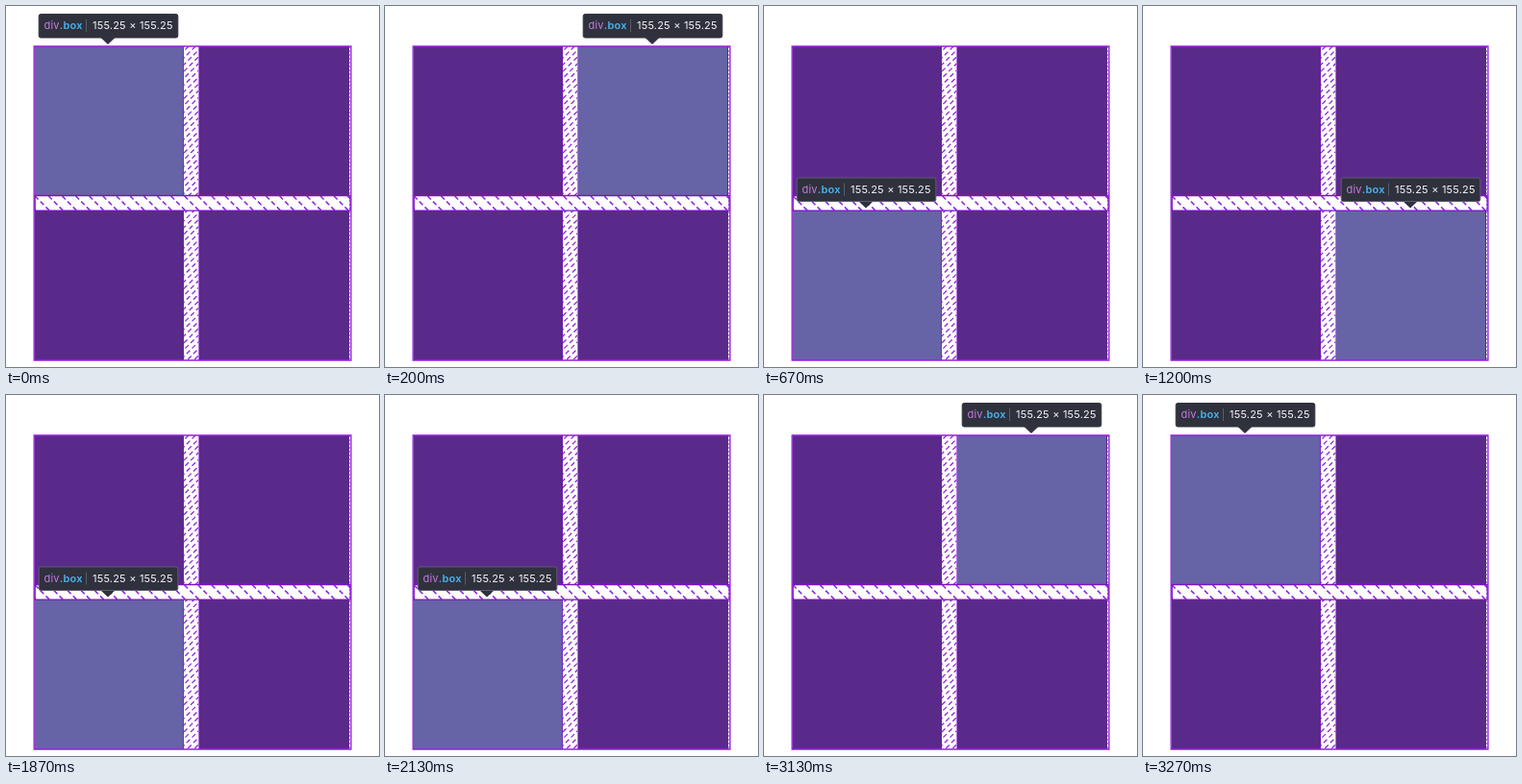
Animation of 388x376 px, one loop 3.79 s. Source, as an HTML page:

```html
<!DOCTYPE html>
<html lang="en">
<meta charset="utf-8">
<title>Grid inspector</title>
<style>
html, body { margin: 0; width: 100%; height: 100%; overflow: hidden; background: #fff; }
svg { display: block; }
.hatch { stroke: #8f2bd6; stroke-width: 1.6; stroke-dasharray: 5 3; fill: none; }
#column { stroke-width: 1.3; }
.line { stroke: #7f10c8; fill: none; }
text { font: 11px Inter, sans-serif; letter-spacing: .2px; fill: #f4f4f6; }
</style>
<svg width="388" height="376" viewBox="0 0 388 376">
  <path d="M30 42h155v155h-155zM201 42h156v155h-156zM30 213h155v156h-155zM201 213h156v156h-156z" fill="#5a2a8a"/>
  <rect id="lit" width="155" fill="#6663a7"/>
  <svg x="185" y="42" width="15" height="327"><path id="column" class="hatch"/></svg>
  <path d="M30 198h328v15h-328z" fill="#fff"/>
  <svg x="30" y="198" width="328" height="15"><path id="row" class="hatch"/></svg>
  <path class="line" d="M184.5 42v155M200.5 42v155M184.5 213v156M200.5 213v156" stroke-opacity=".6"/>
  <path class="line" d="M30.2 197.5h328v15.700h-328z" stroke-width="1.3"/>
  <path class="line" d="M357.5 42v327" stroke-dasharray="2 2" stroke-opacity=".5"/>
  <path class="line" d="M29.200 42h329.700v327h-329.700z" stroke-width="1.4" style="stroke:#9420da"/>
  <g id="tip">
    <path d="M64 24.5h16l-8 7.5z" fill="#2f313d"/>
    <rect id="panel" x=".2" y=".5" width="144.600" height="24.500" rx="2" fill="#2f313d"/>
    <text x="5.500" y="16"><tspan fill="#c77be0">div</tspan><tspan fill="#4bb4ec" font-weight="600">.box</tspan></text>
    <path d="M49.500 6v13" stroke="#5a5c68"/>
    <text x="56" y="16">155.25 × 155.25</text>
  </g>
</svg>
<script>
const $ = id => document.getElementById(id);
const set = (id, attrs) => {
  for (const key in attrs) $(id).setAttribute(key, attrs[key]);
};
const LOOP = 3790;
// [start ms, column, row]
const steps = [[0, 0, 0], [200, 1, 0], [670, 0, 1], [1200, 1, 1],
               [1870, 0, 1], [2470, 1, 0], [3270, 0, 0]];

function hatch(id, from, to, gap, dx, dy) {
  let d = '';
  for (let x = from; x < to; x += gap) d += `M${x} 0l${dx} ${dy}`;
  set(id, { d });
}
hatch('column', 5, 345, 7.07, -327, 327);
hatch('row', -14, 330, 14.14, 15, 15);

function draw(now) {
  const t = now % LOOP;
  const [, col, row] = steps.findLast(s => s[0] <= t);
  set('lit', { x: 30 + 171 * col, y: 42 + 171 * row, height: 155 + row });
  set('tip', { transform: `translate(${34 + 172 * col} ${8 + 170.5 * row})` });
  set('panel', { stroke: row ? '#5f5a72' : '#33343f' });
  requestAnimationFrame(draw);
}
draw(performance.now());
</script>
</html>
```
